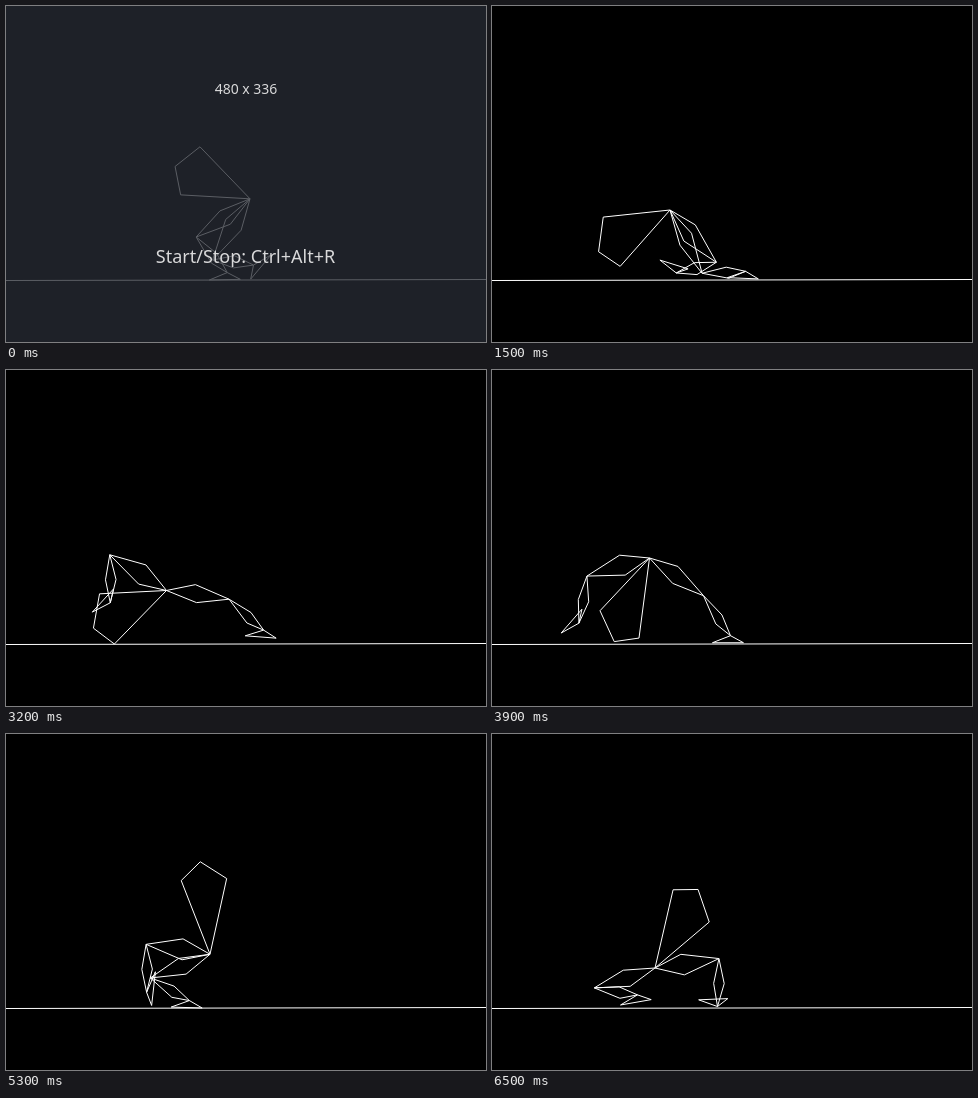
Recreate the animation shown at these times as an HTML page with a canvas. Size 480 px wide and 336 px high, loop 6600 ms.

```html
<!DOCTYPE html>
<html lang="en">
<head>
<meta charset="utf-8">
<title>Stick walker</title>
<style>
  html, body { margin: 0; width: 100%; height: 100%; overflow: hidden; background: #000; }
  canvas { display: block; }
</style>
</head>
<body>
<canvas id="stage" width="480" height="336"></canvas>
<script>
const ctx = document.getElementById('stage').getContext('2d');
const LOOP = 6600, STEP = 100, FLOOR = 274, SQUEEZE = 6 / 7;

// time, hip x, hip y, body, then thigh, shin and foot angles of both legs
const poses = [
  [0, 244, 193, 182.8, 148.7, 44.4, 24, 125.5, 6, 103],
  [500, 167, 204, 232.3, 57, -17.8, -3, 10.8, 80.2, 148.5],
  [1500, 178, 204, 135.9, 59.4, -2.2, 27, 44, 167.1, 343.5],
  [2500, 163.5, 267, 178.6, -17.3, 23.2, 32.5, -109.4, 77.4, 287],
  [3900, 157.5, 188, 98.7, 30.9, 51.8, 25, -193.9, 101.2, 284],
  [4850, 150, 205, 165, 30, 25, 25, -190, 120, 330],
  [5300, 204, 222, 245.5, 161.2, 26.4, 26.5, -172.4, 89.3, 426],
  [5650, 192, 194, 255, 155, 60, 22, -197, 95, 400],
  [6500, 163, 234, 285.1, 164.3, 7.9, 16.5, -367.2, 92, 326.5]
];

// Bone: length, then (along, across) for its two side corners.
// Foot: short edge, long edge, angle between them.
const legs = [
  { thigh: [73.5, 32.8, -9.8, 36.2, 7.9], shin: [50.8, 28.4, -5, 31, 6.2], foot: [16.7, 22.2, 136.4] },
  { thigh: [75.2, 31.6, -9.8, 33.2, 11.1], shin: [48, 24.8, -7, 25, 5.3], foot: [14.4, 23, -129.5] }
];

function poseAt(t) {
  let i = 0;
  while (i < poses.length - 2 && t >= poses[i + 1][0]) i++;
  const a = poses[i], b = poses[i + 1];
  const p = (t - a[0]) / (b[0] - a[0]), e = p * p * (3 - 2 * p);
  return a.map((v, k) => v + (b[k] - v) * e);
}

function offset([x, y], angle, along, across = 0) {
  const r = angle * Math.PI / 180, c = Math.cos(r), s = Math.sin(r);
  return [x + (along * c - across * s) * SQUEEZE, y + along * s + across * c];
}

function bone(from, angle, [length, a1, c1, a2, c2]) {
  return [from, offset(from, angle, a1, c1), offset(from, angle, length), offset(from, angle, a2, c2)];
}

function figure(t) {
  const [, x, y, body, ...joints] = poseAt(t);
  const hip = [x, y];
  const shapes = [[hip, offset(hip, body, 81), offset(hip, body + 17.5, 93.2), offset(hip, body + 38.9, 78.2)]];
  legs.forEach((leg, i) => {
    const [thighAngle, shinAngle, footAngle] = joints.slice(i * 3);
    const thigh = bone(hip, thighAngle, leg.thigh);
    const shin = bone(thigh[2], shinAngle, leg.shin);
    const [short, long, spread] = leg.foot, ankle = shin[2];
    shapes.push(thigh, shin,
      [ankle, offset(ankle, footAngle, short), offset(ankle, footAngle + spread, long)]);
  });
  return shapes;
}

function draw(t) {
  const intro = t < STEP;
  ctx.fillStyle = intro ? '#1e2128' : '#000';
  ctx.fillRect(0, 0, 480, 336);
  ctx.strokeStyle = intro ? '#5b5e64' : '#fff';
  ctx.lineWidth = 1;
  ctx.lineJoin = 'round';

  const shapes = figure(t);
  const lowest = Math.max(...shapes.flat().map(p => p[1]));
  const lift = Math.max(0, lowest - FLOOR); // keep every corner above the floor
  ctx.beginPath();
  ctx.moveTo(0, 274.5);
  ctx.lineTo(480, 273.5);
  for (const shape of shapes) {
    shape.forEach(([x, y], i) => ctx[i ? 'lineTo' : 'moveTo'](x, y - lift));
    ctx.closePath();
  }
  ctx.stroke();

  if (intro) {
    ctx.fillStyle = '#d9d9da';
    ctx.textAlign = 'center';
    ctx.font = '14px "Noto Sans", sans-serif';
    ctx.fillText('480 x 336', 240, 88);
    ctx.font = '18px "Noto Sans", sans-serif';
    ctx.fillText('Start/Stop: Ctrl+Alt+R', 239.5, 257);
  }
}

const start = performance.now();
function tick() {
  const t = (performance.now() - start) % LOOP;
  draw(Math.floor(t / STEP) * STEP);
  requestAnimationFrame(tick);
}
tick();
</script>
</body>
</html>
```
